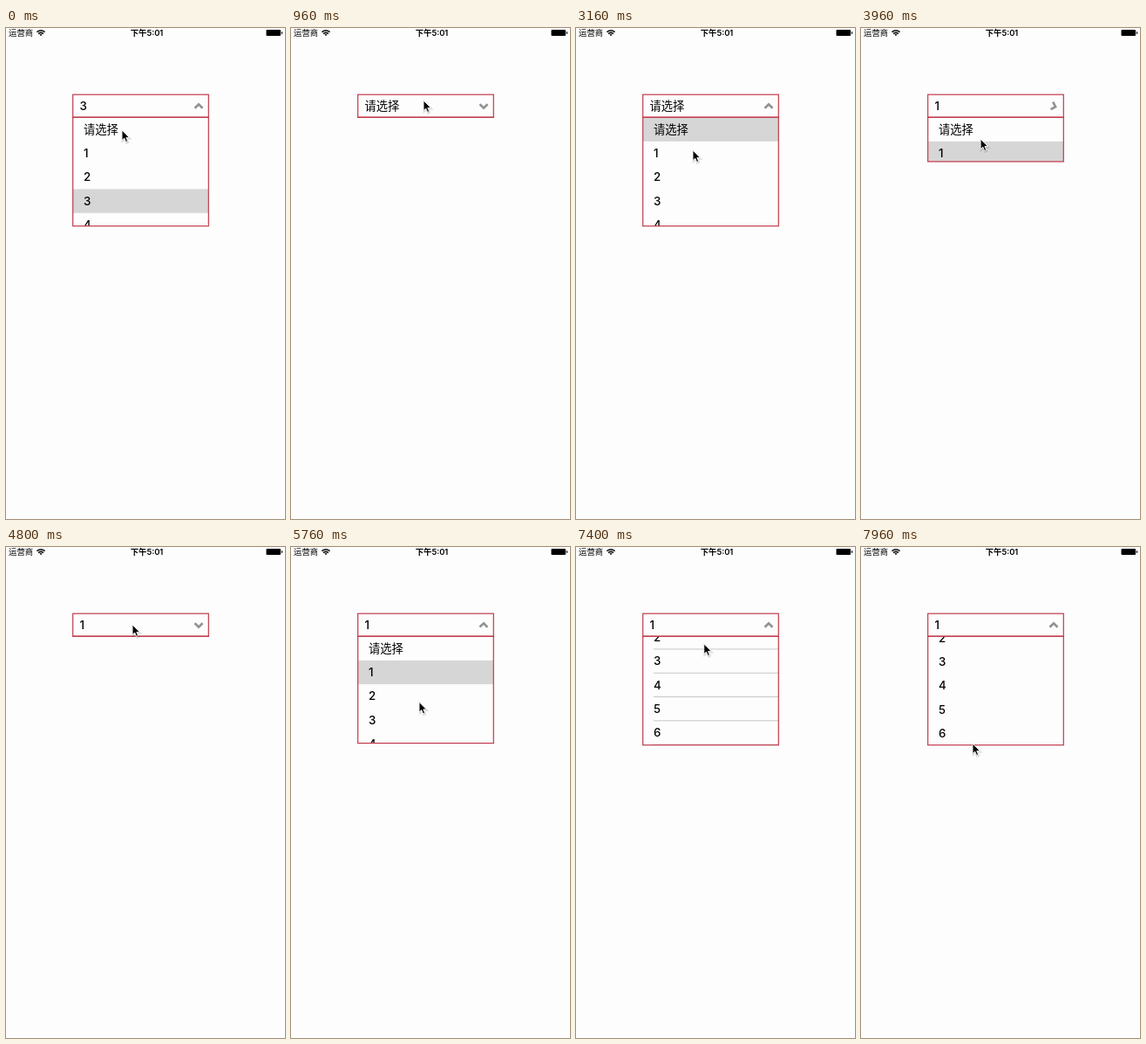
Write an HTML page that moves like this. It is 320 px wide and 562 px high and loops after 8000 ms.

```html
<!DOCTYPE html>
<html lang="zh">
<head>
<meta charset="utf-8">
<style>
  html, body { margin: 0; width: 100%; height: 100%; overflow: hidden; background: #fdfdfd; }
  svg { display: block; width: 100vw; height: 100vh; }
  text { font: 500 13.3px Inter, "Noto Sans CJK SC", "Noto Sans CJK", sans-serif; fill: #000; }
  .status { font-size: 9.4px; }
  .time { font-weight: 600; text-anchor: middle; }
  .frame { fill: none; stroke: #c23a4c; stroke-width: 1.2; }
  .line { stroke: #c6c6c6; }
</style>
</head>
<body>
<svg viewBox="0 0 320 562">
  <defs>
    <clipPath id="clip"><rect id="clipBox" x="77" y="102.2" width="155"/></clipPath>
    <path id="arrow" d="M0 0V11.6L2.7 9.1 4.6 13.4 6.6 12.5 4.8 8.4H8.4Z"/>
  </defs>

  <text class="status" x="3" y="9.3">运营商</text>
  <path d="M35.4 4.6Q40 .8 44.6 4.6M37.1 6.6Q40 4.2 42.9 6.6" fill="none" stroke="#111" stroke-width="1.5"/>
  <path d="M38.5 7.6Q40 6.6 41.5 7.6L40 9.2Z"/>
  <text class="status time" x="161.5" y="9.3">下午5:01</text>
  <rect x="298.5" y="2" width="16.5" height="7" rx="1"/>
  <rect x="315.8" y="4.2" width="1.3" height="2.6" rx=".6"/>

  <g clip-path="url(#clip)"><g id="rows"></g></g>
  <rect id="panel" class="frame" x="76.7" y="102.2" width="155.6"/>
  <rect class="frame" x="76.7" y="76.2" width="155.6" height="26"/>
  <text id="value" x="84.5" y="94.4"></text>
  <path id="chevron" d="M-4.5 2.2L0-2.2 4.5 2.2" fill="none" stroke="#929292" stroke-width="2.7"/>

  <g id="cursor">
    <use href="#arrow" x=".6" y="1.2" stroke="#000" stroke-width="2" opacity=".13"/>
    <use href="#arrow" stroke="#fff" stroke-width=".9"/>
  </g>
</svg>
<script>
const $ = id => document.getElementById(id);
const LOOP = 8000, TOP = 102.5, ROW = 27.3, HEIGHT = 124.5;
const labels = ['请选择', 1, 2, 3, 4, 5, 6];
const MAX_SCROLL = ROW * labels.length - HEIGHT;
const DRAG = 6260, RELEASE = 7160;

const toggles = [360, 1840, 3680, 5300]; // close, open, close, open
const START = [133, 117];
const moves = [ // start time, x, y
  [460, 152, 83], [1940, 134.5, 157.5], [3000, 134, 139.5], [3800, 145.5, 94],
  [4600, 145, 89], [5240, 147, 177.5], [DRAG, 149, 97.5], [7300, 128, 225]
];

function ease(p) {
  p = Math.min(1, Math.max(0, p));
  return p * p * (3 - 2 * p);
}

const openAt = t => toggles.reduce((open, start, i) =>
  open + (i % 2 ? 1 : -1) * ease((t - start) / 500), 1);

const cursorAt = t => moves.reduce(([x, y], [start, toX, toY]) => {
  const duration = Math.min(500, 10 * Math.hypot(toX - x, toY - y));
  const e = duration ? ease((t - start) / duration) : 0;
  return [x + (toX - x) * e, y + (toY - y) * e];
}, START);

// The list follows the drag, resists past its end and springs back on release.
function scrollAt(t) {
  if (t < DRAG) return 0;
  const drag = cursorAt(DRAG)[1] - cursorAt(Math.min(t, RELEASE))[1];
  const over = Math.max(0, drag - MAX_SCROLL) * 0.48;
  const spring = t > RELEASE ? Math.exp((RELEASE - t) / 120) : 1;
  return Math.min(drag, MAX_SCROLL) + over * spring;
}

$('rows').innerHTML = `<rect id="mark" x="77" width="155" height="${ROW}" fill="#d6d6d6"/>` +
  labels.map((label, i) => {
    const y = TOP + ROW * i;
    return `<path class="line" d="M89 ${y + ROW}H232"/><text x="89" y="${y + 18.3}">${label}</text>`;
  }).join('');
const lines = document.querySelectorAll('.line');

function draw(now) {
  const t = now % LOOP;
  const selected = t < 320 ? 3 : t < 3640 ? 0 : 1;
  const open = openAt(t), scroll = scrollAt(t);
  const showLines = scroll > 0.5 && Math.abs(scroll - MAX_SCROLL) > 0.5;

  $('value').textContent = labels[selected];
  $('mark').setAttribute('y', TOP + ROW * selected);
  $('rows').setAttribute('transform', `translate(0 ${-scroll})`);
  lines.forEach(l => l.style.display = showLines ? '' : 'none');
  for (const id of ['clipBox', 'panel']) $(id).setAttribute('height', Math.max(0.01, HEIGHT * open));
  $('chevron').setAttribute('transform', `translate(221 89.5) rotate(${180 * (1 - open)})`);
  $('cursor').setAttribute('transform', `translate(${cursorAt(t)})`);
  requestAnimationFrame(draw);
}
requestAnimationFrame(draw);
</script>
</body>
</html>
```
